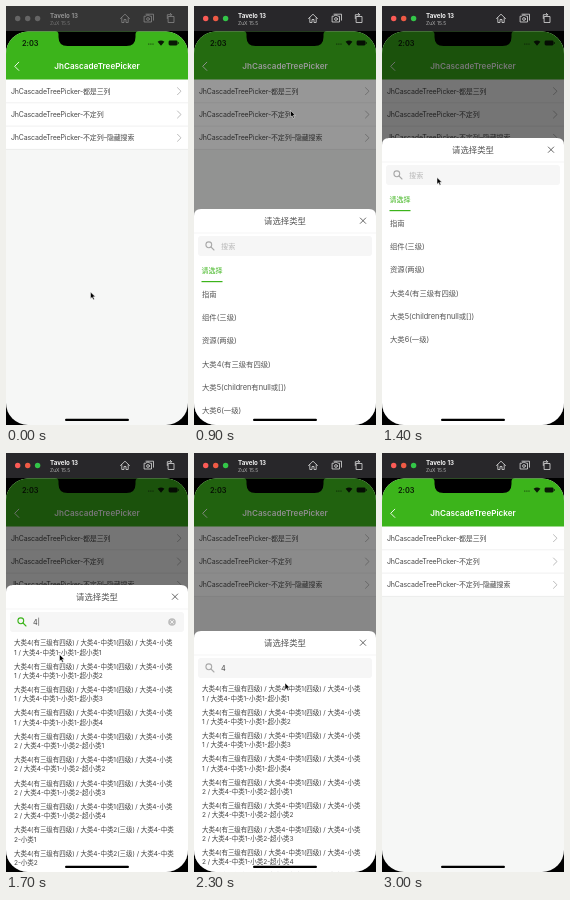
Write an HTML page that moves like this. It is 182 px wide and 419 px high and loops after 3100 ms.

```html
<!DOCTYPE html>
<html lang="en">
<head>
<meta charset="utf-8">
<title>Cascade picker</title>
<style>
  html, body { margin: 0; width: 100%; height: 100%; overflow: hidden; background: #000; }
  svg { display: block; width: 100vw; height: 100vh; }
  text {
    font-family: Inter, "Noto Sans CJK SC", "Noto Sans CJK", sans-serif;
    font-feature-settings: "calt" 0, "liga" 0;
    white-space: pre;
  }
  #menu text { letter-spacing: -.15px; }
  #types text, #results text { letter-spacing: -.05px; }
  .line { fill: none; stroke-linecap: round; stroke-linejoin: round; }
</style>
</head>
<body>
<svg id="stage" viewBox="0 0 182 419">
  <defs>
    <clipPath id="screen"><rect y="25.5" width="182" height="393.5" rx="22"/></clipPath>
  </defs>
  <rect width="182" height="419" fill="#000"/>

  <g id="bar">
    <rect id="barBack" width="182" height="25"/>
    <circle class="light" cx="11.7" cy="12.5" r="2.7"/>
    <circle class="light" cx="21.7" cy="12.5" r="2.7"/>
    <circle class="light" cx="31.6" cy="12.5" r="2.7"/>
    <text id="device" x="44" y="11.8" font-size="6.2" font-weight="700">Tavelo 13</text>
    <text id="system" x="44" y="18.6" font-size="5">ZuX 15.5</text>
    <g id="tools" class="line" stroke-width=".8">
      <path d="M114.5 12.5l4.5-4.3 4.5 4.3M115.8 11.8v4.7h2.2v-3h2v3h2.2v-4.7"/>
      <path d="M140 8.2h7.5v6M138.5 10.2h1.6l.7-1h2.2l.7 1h1.8v5.8h-7z"/>
      <circle cx="142" cy="13" r="1.4"/>
      <path d="M162.5 10.5h5.5v6h-5.5zM161.3 12.5v-3.8h4.2M164.3 7.3l1.4 1.4-1.4 1.4"/>
    </g>
  </g>

  <g clip-path="url(#screen)">
    <rect y="25" width="182" height="394" fill="#f6f7f6"/>
    <rect y="73" width="182" height="70" fill="#fff"/>
    <rect y="25" width="182" height="48.5" fill="#3cb41b"/>
    <g fill="#0a1a06">
      <text x="16" y="39.8" font-size="7.4" font-weight="600">2:03</text>
      <circle cx="142.8" cy="38" r=".6"/><circle cx="144.9" cy="38" r=".6"/><circle cx="147" cy="38" r=".6"/>
      <path d="M151.6 35.8q3.4-2.8 6.8 0l-3.4 4z"/>
      <rect x="162.6" y="34.6" width="9" height="4.8" rx="1.4"/>
      <rect x="172.1" y="36.2" width=".8" height="1.6"/>
    </g>
    <path class="line" d="M12.8 56.2l-4.1 4.1 4.1 4.1" stroke="#fff" stroke-width=".9"/>
    <text x="91" y="63.4" font-size="8.1" font-weight="600" fill="#fff" text-anchor="middle">JhCascadeTreePicker</text>
    <g id="menu"></g>
    <rect id="shade" y="25" width="182" height="394" fill="#000"/>

    <g id="sheet">
      <path d="M0 300V7q0-7 7-7h168q7 0 7 7v293z" fill="#fff"/>
      <text x="91" y="14.8" font-size="8.4" fill="#555" text-anchor="middle">请选择类型</text>
      <path class="line" d="M166.3 9l5.4 5.4M171.7 9l-5.4 5.4" stroke="#555" stroke-width=".9"/>
      <path d="M0 24h182" stroke="#eee" stroke-width=".6"/>
      <rect x="4" y="27" width="174" height="20" rx="3" fill="#f6f6f6"/>
      <g id="lens" class="line" stroke-width="1.1">
        <circle cx="14.8" cy="35.8" r="2.9"/><path d="M17 38l3 3"/>
      </g>
      <text id="query" x="27" y="39.6" font-size="7.2"></text>
      <path id="caret" d="M0 32.6v8.2" stroke="#666" stroke-width=".7"/>
      <g id="clear">
        <circle cx="166" cy="37" r="3.8" fill="#bdbdbd"/>
        <path class="line" d="M164.6 35.6l2.8 2.8M167.4 35.6l-2.8 2.8" stroke="#fff" stroke-width=".8"/>
      </g>
      <g id="types">
        <text x="7.5" y="64.2" font-size="7" font-weight="500" fill="#3cb41b">请选择</text>
        <rect x="7.5" y="72" width="21" height="1.2" fill="#3cb41b"/>
      </g>
      <g id="results"></g>
    </g>

    <path d="M49 25h84q-3.5 0-3.5 3.5v2.5q0 9-9 9h-59q-9 0-9-9v-2.5q0-3.5-3.5-3.5z" fill="#000"/>
    <rect x="59" y="412.8" width="64" height="2.3" rx="1.15" fill="#000"/>
  </g>
  <path id="cursor" d="M0 0v6.8l1.6-1.5 1.1 2.5 1.2-.5-1.1-2.5h2.1z" fill="#000" stroke="#fff" stroke-width=".5"/>
</svg>

<script>
const LOOP = 3100, STEP = 100, OPEN_TOP = 132, CLOSED_TOP = 419;
const $ = id => document.getElementById(id);

function add(parent, tag, attrs, content = '') {
  const el = document.createElementNS('http://www.w3.org/2000/svg', tag);
  for (const key in attrs) el.setAttribute(key, attrs[key]);
  el.textContent = content;
  $(parent).appendChild(el);
}
const label = (parent, x, y, size, fill, content) =>
  add(parent, 'text', { x, y, 'font-size': size, fill }, content);

['都是三列', '不定列', '不定列–隐藏搜索'].forEach((name, i) => {
  const y = 85.2 + i * 23.3;
  label('menu', 5, y + 2.6, 7, '#484848', 'JhCascadeTreePicker-' + name);
  add('menu', 'path', { class: 'line', d: `M171.5 ${y - 3.5}l3.5 3.5-3.5 3.5`, stroke: '#aaa', 'stroke-width': .8 });
  add('menu', 'path', { d: `M0 ${y + 11.6}h182`, stroke: '#e6e6e6', 'stroke-width': .6 });
});

['指南', '组件(三级)', '资源(两级)', '大类4(有三级有四级)', '大类5(children有null或[])', '大类6(一级)']
  .forEach((name, i) => label('types', 8, 87.9 + i * 23.2, 7.4, '#555', name));

for (let i = 0; i < 11; i++) {
  const y = 60.4 + i * 23.35, sub = (i >> 2) + 1, leaf = i % 4 + 1;
  const deep = i < 8;
  const head = '大类4(有三级有四级) / 大类4-' + (deep ? '中类1(四级) / 大类4-小类' : '中类2(三级) / 大类4-中类');
  const tail = deep ? `${sub} / 大类4-中类1-小类${sub}-超小类${leaf}` : `2-小类${leaf}`;
  label('results', 8, y, 6.53, '#444', head);
  label('results', 8, y + 9.3, 6.53, '#444', tail);
}

// Keys are [time, value...]; values ease between neighbouring keys.
function track(keys, t, ease) {
  let i = 0;
  while (i < keys.length - 2 && t >= keys[i + 1][0]) i++;
  const a = keys[i], b = keys[i + 1];
  const p = ease(Math.min(1, Math.max(0, (t - a[0]) / (b[0] - a[0]))));
  return a.slice(1).map((v, k) => v + (b[k + 1] - v) * p);
}
const smooth = p => p * p * (3 - 2 * p);
const linear = p => p;

const path = [
  [0, 84.5, 286], [500, 96.5, 104.5], [1000, 96.5, 104.5], [1400, 55, 171.5],
  [1500, 55, 171.5], [1700, 53.5, 201.5], [2200, 91, 230], [2400, 91, 230], [2800, 192, 300]
];
const slide = [
  [700, CLOSED_TOP], [800, 310], [900, 203], [1000, 150], [1100, OPEN_TOP],
  [2200, OPEN_TOP], [2300, 178], [2400, 300], [2500, 392], [2600, CLOSED_TOP + 4]
];

const show = (id, on) => $(id).setAttribute('visibility', on ? 'visible' : 'hidden');
const paint = (id, attr, value) => $(id).setAttribute(attr, value);
const lights = [...document.querySelectorAll('.light')];
const lightColors = ['#fb5b56', '#ee5a45', '#33c548'];

function draw(t) {
  const active = t >= 700;
  const focused = t >= 1500 && t < 2200;
  const typed = t >= 1600;

  paint('barBack', 'fill', active ? '#28272a' : '#353535');
  paint('device', 'fill', active ? '#f2f2f2' : '#929292');
  paint('system', 'fill', active ? '#b0b0b0' : '#757575');
  paint('tools', 'stroke', active ? '#dcdcdc' : '#868686');
  lights.forEach((el, i) => el.setAttribute('fill', active ? lightColors[i] : '#656565'));

  const [top] = track(slide, t, linear);
  const open = Math.max(0, (CLOSED_TOP - top) / (CLOSED_TOP - OPEN_TOP));
  paint('sheet', 'transform', `translate(0 ${top})`);
  paint('shade', 'opacity', .54 * open);

  $('query').textContent = typed ? '4' : '搜索';
  paint('query', 'fill', typed ? '#444' : '#b8b8b8');
  paint('lens', 'stroke', focused ? '#3cb41b' : '#aaa');
  paint('caret', 'transform', `translate(${typed ? 32.6 : 27} 0)`);
  show('caret', focused);
  show('clear', focused && typed);
  show('types', !typed);
  show('results', typed);

  const [x, y] = track(path, t, smooth);
  paint('cursor', 'transform', `translate(${x} ${y})`);
}

const start = performance.now();
function tick() {
  const t = (performance.now() - start) % LOOP;
  draw(Math.floor(t / STEP) * STEP);
  requestAnimationFrame(tick);
}
tick();
</script>
</body>
</html>
```
